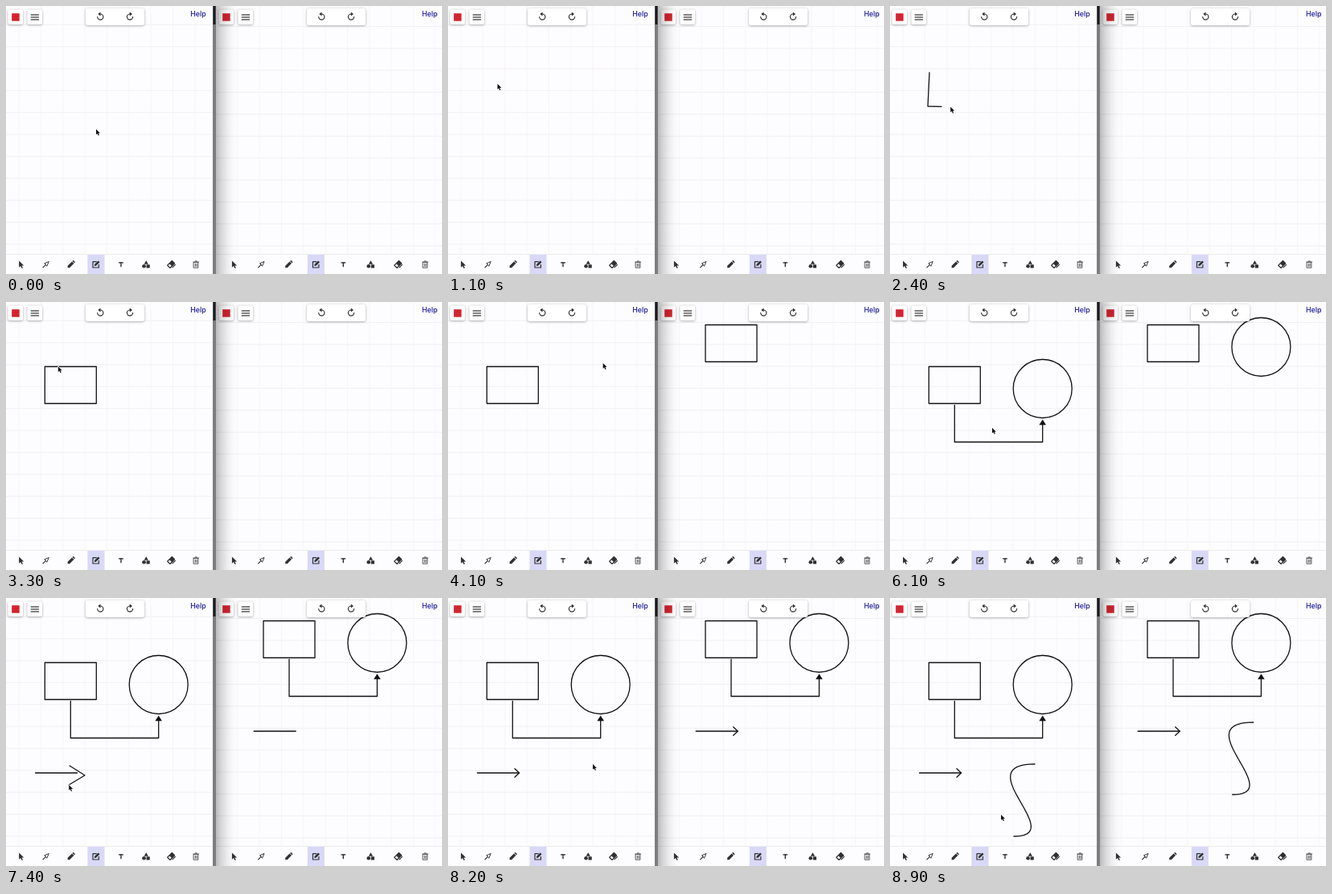
Write an HTML page with a canvas that moves like this. It is 542 px wide and 334 px high and loops after 9000 ms.

```html
<!DOCTYPE html>
<html lang="en">
<head>
<meta charset="utf-8">
<title>Shape recognition on a shared whiteboard</title>
<style>
html, body { margin: 0; width: 100%; height: 100%; overflow: hidden; background: #fdfcfe; }
canvas { display: block; width: 542px; height: 334px; }
</style>
</head>
<body>
<canvas id="stage"></canvas>
<script>
const W = 542, H = 334, LOOP = 9000, STEP = 100, CELL = 27.35;
const INK = '#111', ICON = '#303033', PAPER = '#fdfcfe';
const canvas = document.getElementById('stage');
const ctx = canvas.getContext('2d');
const ratio = window.devicePixelRatio || 1;
canvas.width = W * ratio;
canvas.height = H * ratio;

const sample = (n, f) => Array.from({ length: n + 1 }, (_, i) => f(i / n));
const mix = (a, b, u) => a + (b - a) * u;
const smooth = u => u * u * (3 - 2 * u);
const cubic = (a, b, c, d, u) => {
  const v = 1 - u;
  return v * v * v * a + 3 * v * v * u * b + 3 * v * u * u * c + u * u * u * d;
};

const round = { x: 189.7, y: 108, r: 36.5 };
const handCircle = sample(48, u => {
  const a = -1.45 - u * Math.PI * 2, r = round.r * mix(0.88, 1, u);
  return [round.x + r * Math.cos(a), round.y + r * Math.sin(a)];
});
const wave = sample(40, u => [cubic(180, 95, 223, 154, u), cubic(207, 207, 297, 297, u)]);

// Pointer gestures: pen down and up, path, ink delay, time the ink turns into a clean shape
const gestures = [
  { down: 0, up: 100, path: [[112, 153.5]] },
  { down: 1500, up: 3080, path: [[49, 83], [47, 125], [112, 126.5], [112, 80], [49, 81]], lag: 75, snap: 3300 },
  { down: 4150, up: 4700, path: handCircle, lag: 15, snap: 4800 },
  { down: 4900, up: 5800, path: [[89, 107], [89, 174], [189, 174], [186, 117]], lag: 15, snap: 6000 },
  { down: 6500, up: 6800, path: [[36, 218], [88, 218]], lag: 15, snap: 6900 },
  { down: 7050, up: 7380, path: [[79, 209], [98, 221], [78, 233]], lag: 15, snap: 7700 },
  { down: 8200, up: 8600, path: wave, lag: 15, snap: 8700 },
  { down: 8900, up: LOOP, path: [[138, 270]] }
];

// Clean shapes: time on the left board, time on the right board
const shapes = [
  { times: [3300, 3600], draw: () => ctx.strokeRect(48.3, 80.5, 64, 46) },
  { times: [4800, 5000], draw: () => { disc(round.x, round.y, round.r); ctx.stroke(); } },
  { times: [6000, 6300], draw() {
    strokeLine([[80.3, 128.5], [80.3, 174.5], [189.7, 174.5], [189.7, 152]]);
    fillShape([[189.7, 146.5], [194, 153.3], [185.4, 153.3]]);
  } },
  { times: [6900, 7200], draw: () => strokeLine([[36.5, 218], [88.5, 218]]) },
  { times: [7700, 8000], draw: () => strokeLine([[83, 212.8], [88.5, 218], [83, 223.2]]) },
  { times: [8700, 8800], draw: () => strokeLine(wave) }
];

// The first part of a path, cut at fraction u of its length
function cut(path, u) {
  const size = i => Math.hypot(path[i][0] - path[i - 1][0], path[i][1] - path[i - 1][1]);
  let left = 0;
  for (let i = 1; i < path.length; i++) left += size(i);
  left *= u;
  const out = [path[0]];
  for (let i = 1; i < path.length && left > 0; i++) {
    const part = Math.min(1, left / size(i));
    out.push([0, 1].map(k => mix(path[i - 1][k], path[i][k], part)));
    left -= size(i);
  }
  return out;
}

function traced(g, t) {
  const u = Math.min(1, Math.max(0, (t - g.down) / (g.up - g.down)));
  return cut(g.path, u * u);
}

function pointer(t) {
  const i = gestures.findLastIndex(g => t >= g.down);
  const g = gestures[i], next = gestures[i + 1];
  const [x, y] = traced(g, t).at(-1);
  if (t <= g.up || !next) return [x, y];
  const u = smooth((t - g.up) / (next.down - g.up));
  return [mix(x, next.path[0][0], u), mix(y, next.path[0][1], u)];
}

function line(points, close) {
  ctx.beginPath();
  points.forEach(p => ctx.lineTo(...p));
  if (close) ctx.closePath();
}

function strokeLine(points, close) { line(points, close); ctx.stroke(); }
function fillShape(points) { line(points, true); ctx.fill(); }

function disc(x, y, r) {
  ctx.beginPath();
  ctx.arc(x, y, r, 0, Math.PI * 2);
}

function at(x, y, draw) {
  ctx.save();
  ctx.translate(x, y);
  draw();
  ctx.restore();
}

function pen(color, width) {
  ctx.strokeStyle = ctx.fillStyle = color;
  ctx.lineWidth = width;
  ctx.lineJoin = ctx.lineCap = 'round';
}

function drawShapes(t, side) {
  pen(INK, 1.3);
  for (const s of shapes) if (t >= s.times[side]) s.draw();
}

function drawInk(t) {
  pen(INK, 1.3);
  for (const g of gestures) if (t > g.down && t < g.snap) strokeLine(traced(g, t - g.lag));
}

function drawGrid(left, right, x0, y0) {
  ctx.fillStyle = '#f6f5f8';
  for (let x = x0; x < right; x += CELL) ctx.fillRect(x - 0.5, 0, 1, 310);
  ctx.fillStyle = '#f1f0f3';
  for (let y = y0; y < 310; y += CELL) ctx.fillRect(left, y - 0.5, right - left, 1);
}

function card(x, y, w, h) {
  ctx.save();
  ctx.shadowColor = 'rgba(0,0,0,.35)';
  ctx.shadowBlur = 3 * ratio;
  ctx.shadowOffsetY = 0.8 * ratio;
  ctx.fillStyle = '#fff';
  ctx.beginPath();
  ctx.roundRect(x, y, w, h, 2.5);
  ctx.fill();
  ctx.restore();
}

function turnArrow(x, flip) {
  at(x, 13, () => {
    ctx.scale(flip, 1);
    pen(ICON, 1.2);
    ctx.beginPath();
    ctx.arc(0, 0.6, 3.6, -Math.PI / 2, Math.PI);
    ctx.stroke();
    fillShape([[-3, -3], [0.2, -5.4], [0.2, -0.6]]);
  });
}

// A slanted body, used by the tools that are held like a pen
function slanted(draw) {
  ctx.rotate(-Math.PI / 4);
  draw();
}

const icons = [
  function select() {
    fillShape([[-2.6, -4.5], [3.6, 1.4], [0.9, 1.6], [2.3, 4.5], [0.9, 5], [-0.5, 2.1], [-2.6, 3.8]]);
  },
  function laser() {
    slanted(() => {
      strokeLine([[-5.4, 0], [-0.5, 0]]);
      ctx.lineWidth = 0.9;
      strokeLine([[-0.5, -2.2], [5, 0], [-0.5, 2.2]], true);
    });
  },
  function pencil() {
    slanted(() => {
      fillShape([[-6, 0], [-4.2, -1.7], [3.4, -1.7], [3.4, 1.7], [-4.2, 1.7]]);
      ctx.fillRect(4.1, -1.7, 1.6, 3.4);
    });
  },
  function sketch() {
    strokeLine([[0.4, -3.3], [-3.9, -3.3], [-3.9, 4], [3.5, 4], [3.5, 0.4]]);
    slanted(() => fillShape([[-2.7, 0], [-1.3, -1.3], [5.2, -1.3], [5.2, 1.3], [-1.3, 1.3]]));
  },
  function text() {
    ctx.fillRect(-2.8, -2.8, 5.6, 1.4);
    ctx.fillRect(-0.7, -2.8, 1.4, 6);
  },
  function figures() {
    fillShape([[0.2, -4.8], [2.9, -0.2], [-2.5, -0.2]]);
    disc(-2.5, 2.2, 2.3);
    ctx.fill();
    ctx.fillRect(0.5, 0.3, 4.2, 4.2);
  },
  function eraser() {
    slanted(() => {
      ctx.strokeRect(-4, -2.3, 8, 4.6);
      ctx.fillRect(-0.8, -2.3, 4.8, 4.6);
    });
    strokeLine([[-1.5, 4], [3.5, 4]]);
  },
  function bin() {
    pen('#55555a', 1);
    strokeLine([[-3.5, -3], [3.5, -3]]);
    strokeLine([[-1.2, -4], [1.2, -4]]);
    ctx.strokeRect(-2.7, -2.6, 5.4, 6.8);
    for (const x of [-0.9, 0.9]) strokeLine([[x, -1], [x, 2.6]]);
  }
];

function drawControls(b) {
  card(b.logo, 4.5, 18.5, 18.5);
  ctx.fillStyle = '#d3242f';
  ctx.fillRect(b.logo + 4.7, 9.2, 9.5, 9.5);

  card(b.logo + 24, 4.5, 18.5, 18.5);
  ctx.fillStyle = ICON;
  for (let i = 0; i < 3; i++) ctx.fillRect(b.logo + 28.2, 10.4 + i * 3, 10.4, 1.2);

  card(b.undo, 3, 73, 21);
  turnArrow(b.undo + 18.3, 1);
  turnArrow(b.undo + 55, -1);

  ctx.fillStyle = '#1a1a96';
  ctx.font = '500 8.8px Inter, Arial, sans-serif';
  ctx.fillText('Help', b.help, 13.2);

  ctx.fillStyle = '#ececef';
  ctx.fillRect(b.left, 309, b.right - b.left, 1);
  ctx.fillStyle = PAPER;
  ctx.fillRect(b.left, 310, b.right - b.left, 24);
  ctx.fillStyle = '#d8d9f6';
  ctx.fillRect(b.tool + 3 * b.gap - 10.5, 310, 21, 24);
  icons.forEach((draw, i) => at(b.tool + i * b.gap, 322, () => {
    pen(ICON, 1.2);
    draw();
  }));
}

function drawDivider() {
  const shade = ctx.createLinearGradient(261, 0, 289, 0);
  for (const u of [0, 0.25, 0.5, 0.75, 1]) {
    shade.addColorStop(u, `rgba(0,0,0,${0.26 * (1 - u) ** 2})`);
  }
  ctx.fillStyle = shade;
  ctx.fillRect(261, 0, 28, H);
  ctx.fillStyle = '#7d7d80';
  ctx.fillRect(257, 0, 4, H);
  ctx.fillStyle = '#1c1c1f';
  ctx.fillRect(257.5, 0, 3, 23);
}

function drawPointer([x, y]) {
  at(x, y, () => {
    const arrow = [[0, 0], [0, 6.8], [1.6, 5.4], [2.7, 8], [3.9, 7.5], [2.8, 5], [4.9, 4.9]];
    pen('#fff', 1.2);
    strokeLine(arrow, true);
    ctx.fillStyle = INK;
    fillShape(arrow);
  });
}

const LEFT = { left: 0, right: 257, logo: 2.5, undo: 99, help: 229.3, tool: 18.7, gap: 31.07 };
const RIGHT = { left: 261, right: W, logo: 264.5, undo: 374, help: 517, tool: 283.5, gap: 33.95 };

function render(t) {
  ctx.setTransform(ratio, 0, 0, ratio, 0, 0);
  ctx.fillStyle = PAPER;
  ctx.fillRect(0, 0, W, H);
  drawGrid(0, 257, 16, 23.3);
  drawGrid(261, W, 287.7, 25.5);
  drawShapes(t, 0);
  at(271.7, -52, () => drawShapes(t, 1));
  drawInk(t);
  drawControls(LEFT);
  drawControls(RIGHT);
  drawDivider();
  drawPointer(pointer(t));
}

const start = performance.now();
function tick() {
  const t = (performance.now() - start) % LOOP;
  render(Math.floor(t / STEP) * STEP);
  requestAnimationFrame(tick);
}
tick();
</script>
</body>
</html>
```
